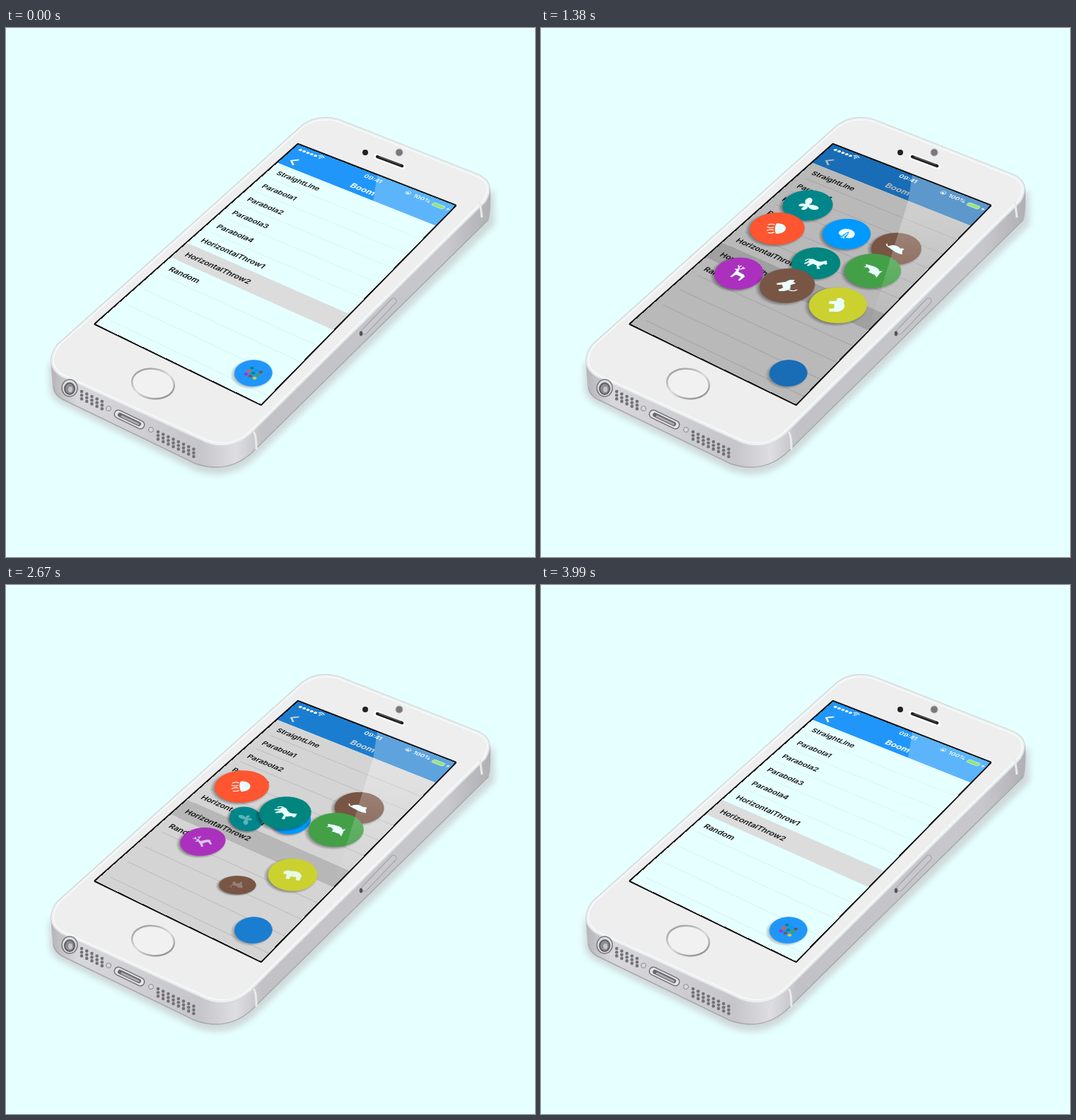
These frames come from a looping animation (748 px wide and 748 px high, 4.02 s). An HTML page:

```html
<!DOCTYPE html>
<html lang="en">
<head>
<meta charset="utf-8">
<title>Boom menu</title>
<style>
html, body { margin: 0; width: 100%; height: 100%; overflow: hidden; background: #e6ffff; }
svg { position: absolute; left: 0; top: 0; overflow: hidden; }
#screen { transform-origin: 0 0; font-family: Inter, Roboto, sans-serif; }
</style>
</head>
<body>
<svg width="748" height="748" id="phone">
  <defs>
    <linearGradient id="side" gradientUnits="userSpaceOnUse" x1="63" y1="0" x2="686" y2="0">
      <stop offset="0" stop-color="#b4b4b8"/><stop offset=".06" stop-color="#d8d8db"/>
      <stop offset=".34" stop-color="#c6c6ca"/><stop offset=".42" stop-color="#dedee2"/>
      <stop offset=".48" stop-color="#c2c2c6"/><stop offset=".9" stop-color="#c8c8cc"/>
      <stop offset="1" stop-color="#b0b0b4"/>
    </linearGradient>
    <linearGradient id="ring" x2="1" y2="1">
      <stop offset="0" stop-color="#8c8c8c"/><stop offset=".5" stop-color="#dcdcdc"/>
      <stop offset="1" stop-color="#777"/>
    </linearGradient>
    <filter id="soft"><feGaussianBlur stdDeviation="4"/></filter>
  </defs>
  <path d="M61 475L62 514Q66 527 80 533L268 626Q312 642 350 611L691 278L690 230Z" fill="#c6cccd" opacity=".75" filter="url(#soft)"/>
  <path d="M63 468L66 508Q68 520 80 526L268 617Q312 632 346 603L682 272Q686 264 685 226Z" fill="url(#side)"/>
  <path d="M67 508Q69 519 80 525L268 616Q312 631 346 602L682 271" fill="none" stroke="#a9a9ae" stroke-width="1.5"/>
  <path d="M72 448L418 138Q440 121 470 129L668 207Q694 219 678 246L346 574Q318 600 282 586L78 493Q52 476 72 448Z" fill="#eee" stroke="#d2d7d9" stroke-width="1.2"/>
  <path d="M75 449L420 140Q441 125 469 132L666 210Q689 220 675 244L344 571Q317 595 283 582L80 490Q57 475 75 449Z" fill="none" stroke="#f4fcfc" stroke-width="1.5"/>
  <path d="M350 571Q354 575 354 596M670 245L673 268" fill="none" stroke="#eaeaed" stroke-width="3"/>
  <path d="M507 429L548 386" stroke="#98989e" stroke-width="9" stroke-linecap="round"/>
  <path d="M507 429L548 386" stroke="#c8c8cd" stroke-width="7" stroke-linecap="round"/>
  <ellipse cx="502" cy="432" rx="2.3" ry="3.5" fill="#555"/>
  <g id="holes" fill="#717177"></g>
  <ellipse cx="90" cy="509" rx="11" ry="12" fill="#dcdce0" stroke="#77777c" stroke-width="1.5"/>
  <ellipse cx="90" cy="510" rx="7" ry="8" fill="#8d8d92" stroke="#5d5d62" stroke-width="2"/>
  <ellipse cx="91" cy="511" rx="3" ry="4" fill="#c5c5c9"/>
  <g stroke-linecap="round">
    <path d="M159 546L190 561" stroke="#707076" stroke-width="13"/>
    <path d="M159 546L190 561" stroke="#e4e4e8" stroke-width="10"/>
    <path d="M161 547L188 560" stroke="#68686d" stroke-width="6"/>
    <path d="M164 549L187 560" stroke="#adadb2" stroke-width="3"/>
    <path d="M524 182L561 196" stroke="#fff" stroke-width="8"/>
    <path d="M525 182L560 195" stroke="#222" stroke-width="4.5"/>
    <path d="M528 182L558 193" stroke="#777" stroke-width="1"/>
  </g>
  <g fill="#d8d8dc" stroke="#89898e"><circle cx="145" cy="538" r="3.5"/><circle cx="205" cy="568" r="3.5"/></g>
  <circle cx="508" cy="176" r="4" fill="#222"/>
  <circle cx="556" cy="176" r="5" fill="#77797d" stroke="#aaa"/>
  <ellipse cx="208" cy="503" rx="30" ry="21" transform="rotate(9 208 503)" fill="#f1f1f1" stroke="url(#ring)" stroke-width="2.5"/>
  <path d="M413 164.800L635 251L360.500 532L126.500 418.500Z" fill="#111" stroke="#111" stroke-width="4" stroke-linejoin="round"/>
</svg>

<svg width="320" height="568" id="screen">
  <defs>
    <radialGradient id="shade">
      <stop offset=".82" stop-opacity=".38"/><stop offset="1" stop-opacity="0"/>
    </radialGradient>
  </defs>
  <rect class="base" width="320" height="568"/>
  <rect y="328" width="320" height="44" fill="#dcdcdc"/>
  <g id="rows" font-size="15" font-weight="600" fill="#111"></g>
  <rect width="320" height="64" fill="#2196fa"/>
  <path d="M27 36.500L17 46L27 54.500" fill="none" stroke="#fff" stroke-width="3.5"/>
  <text x="166" y="53.500" font-size="17" font-weight="700" fill="#fff" text-anchor="middle">Boom</text>
  <circle cx="271" cy="524" r="32" fill="url(#shade)" opacity=".6"/>
  <circle cx="272" cy="520" r="29" fill="#2196fa"/>
  <rect id="dim" width="320" height="568"/>
  <g id="status" fill="#fff" font-size="12" font-weight="600">
    <path d="M49 8Q55 2 61 8M51.500 11Q55 7 58.500 11" fill="none" stroke="#fff" stroke-width="1.7"/>
    <circle cx="55" cy="13.500" r="1.600"/>
    <text x="165" y="17" font-size="13" text-anchor="middle">09:41</text>
    <circle cx="236" cy="13" r="4.500" fill="none" stroke="#fff" stroke-width="1.200"/>
    <path d="M234 12h4v4h-4z"/>
    <text x="264" y="18" text-anchor="middle">100%</text>
    <rect x="286" y="11.500" width="22" height="9" rx="2" fill="#6fd84a" stroke="#d9f7d0"/>
    <path d="M316 10L312 16H315L313 21L318 14H315Z"/>
  </g>
  <g id="items"></g>
</svg>

<svg width="748" height="748">
  <defs>
    <linearGradient id="fade" gradientUnits="userSpaceOnUse" x1="0" y1="270" x2="0" y2="430">
      <stop offset="0" stop-color="#fff" stop-opacity=".3"/><stop offset="1" stop-color="#fff" stop-opacity="0"/>
    </linearGradient>
    <mask id="fading"><rect width="748" height="748" fill="url(#fade)"/></mask>
  </defs>
  <path class="base" d="M525 208L635 251L463 427L519 245Z" mask="url(#fading)"/>
</svg>

<script>
const $ = id => document.getElementById(id);
const LOOP = 4020, OPEN = 270, CLOSE = 1950, FLIGHT = 1000, DELAY = 50;
const TOTAL = FLIGHT + 8 * DELAY;
const clamp = x => Math.min(1, Math.max(0, x));

// Maps the 320 x 568 screen onto a quadrilateral.
function perspective([x0, y0], [x1, y1], [x2, y2], [x3, y3]) {
  const sx = x0 - x1 + x2 - x3, sy = y0 - y1 + y2 - y3;
  const ax = x1 - x2, ay = y1 - y2, bx = x3 - x2, by = y3 - y2;
  const det = ax * by - bx * ay;
  const g = (sx * by - bx * sy) / det, h = (ax * sy - sx * ay) / det;
  const col = (x, y, w, size) => [x / size, y / size, 0, w / size];
  return `matrix3d(${[
    ...col(x1 - x0 + g * x1, y1 - y0 + g * y1, g, 320),
    ...col(x3 - x0 + h * x3, y3 - y0 + h * y3, h, 568),
    0, 0, 1, 0, x0, y0, 0, 1]})`;
}
$('screen').style.transform = perspective([413, 164.8], [635, 251], [360.5, 532], [126.5, 418.5]);

function grille(x, y, columns) {
  let dots = '';
  for (let c = 0; c < columns; c++)
    for (let r = 0; r < 3; r++)
      dots += `<circle cx="${x + c * 7.2}" cy="${y + c * 3.5 + r * 5.2}" r="2.3"/>`;
  return dots;
}
$('holes').innerHTML = grille(107, 514, 5) + grille(215, 571, 8);

const labels = ['StraightLine', 'Parabola1', 'Parabola2', 'Parabola3', 'Parabola4',
  'HorizontalThrow1', 'HorizontalThrow2', 'Random'];
let rows = '';
for (let i = 0; i < 11; i++) {
  rows += `<path d="M15 ${108 + 44 * i}H320" stroke="#c8c7cc" stroke-width=".8" class="line"/>`;
  if (labels[i]) rows += `<text x="16" y="${93 + 44 * i}">${labels[i]}</text>`;
}
$('rows').innerHTML = rows;
const lines = $('rows').querySelectorAll('.line');

let signal = '';
for (let i = 0; i < 5; i++) signal += `<circle cx="${12.5 + 8 * i}" cy="11" r="3"/>`;
$('status').insertAdjacentHTML('beforeend', signal);

// Colour, opening order, closing order, filled outline, stroked details
const items = [
  ['#00868a', 4, 1, 'M0-2C-4-14-18-16-17-8C-16-1-8 2-3 1C-10 4-10 13-5 13C-2 13 0 6 0 4C0 6 2 13 5 13C10 13 10 4 3 1C8 2 16-1 17-8C18-16 4-14 0-2Z', ''],
  ['#0099ff', 1, 2, 'M-4 9C-19 9-16-13 0-13C16-13 19 9 4 9L2-3L0-7L-2-3Z', 'M0-2V9M-3 13L0 9L3 13'],
  ['#795545', 3, 5, 'M-13 7C-13-3-4-7 4-5C6-10 12-8 10-4L17 3C13 6 8 6 4 7Z', 'M-12 6Q-17 7-19 2'],
  ['#ff5530', 7, 8, 'M-13 1C-13-17 13-17 13 1C8 4-8 4-13 1Z', 'M-9 4q-4 5 0 10M-3 5q3 5-1 10M4 5q-3 5 1 10M9 4q4 4 1 9'],
  ['#00857f', 2, 6, 'M-13 3C-15-4-12-7-6-6C0-5 5-6 8-11L11-15L17-8L15-5L12-6C11-1 10 2 8 3L14 8L10 11L4 4L-3 4L-6 13L-9 13L-9 4L-14 12L-16 10Z', 'M-12-3Q-18-3-18 5'],
  ['#43a047', 6, 7, 'M-16 9C-10-4-4-10 2-9L2-14L7-9C11-8 12-6 17-4L10-2C8 2 4 3 3 7L-1 4L-8 6L-9 13L-11 9Z', ''],
  ['#ab30be', 0, 3, 'M-13-5L-6-10L-3-3L8-2L13 1L12 14L9 14L8 5L-2 5L-4 14L-7 14L-7 2L-8-4Z', 'M-6-9L-13-16M-9-13L-8-18M-5-9L1-16M-2-13L-4-17'],
  ['#795545', 5, 0, 'M-12-6L-10-13L-6-10L-2-13L0-5L8-3C12 0 12 8 10 14L6 14L4 7L-4 7L-5 14L-9 14L-9 1Z', 'M9 0Q17-4 13-12'],
  ['#cbd12f', 8, 4, 'M-16-4L-10-9L-4-8C4-11 12-8 15 0L14 12L8 12L7 5L-2 5L-3 12L-9 12L-9 2L-15 1Z', '']
];
$('items').innerHTML = items.map(([color, , , shape, detail]) => `<g>
  <circle r="44" fill="url(#shade)"/>
  <g><circle r="40" fill="${color}"/><g fill="#e9ffff"><path d="${shape}"/>
  <path d="${detail}" fill="none" stroke="#e9ffff" stroke-width="2"/></g></g></g>`).join('');
const nodes = [...$('items').children];
const bases = document.querySelectorAll('.base');

// Ease out with a slight overshoot; closing plays it backwards.
function ease(x) {
  if (x <= 0) return 0;
  if (x >= 1) return 1;
  const d = x - 0.74;
  return clamp(1.079 - 1.377 * d * d * (1 - 0.58 * d) - 1) + clamp(1.079 - 1.377 * d * d * (1 - 0.58 * d));
}

function draw(now) {
  const t = now % LOOP;
  const since = (start, span) => clamp((t - start) / span);
  const dim = since(OPEN, TOTAL) - since(CLOSE, TOTAL);
  $('dim').setAttribute('opacity', 0.345 * dim);
  lines.forEach(l => l.setAttribute('opacity', dim > 0 ? 1 : 0.45));
  bases.forEach(b => b.setAttribute('fill', dim > 0 ? '#fff' : '#e6ffff'));

  items.forEach(([, first, last], i) => {
    const c = i % 3 - 1, r = Math.floor(i / 3) - 1;
    const phase = since(OPEN + first * DELAY, FLIGHT) - since(CLOSE + last * DELAY, FLIGHT);
    const p = ease(phase), size = k => 0.075 + 0.925 * k;
    const x0 = 272 + 8 * c, y0 = 520 + 8 * r;
    const x = x0 + (160 + 90 * c - x0) * p;
    const y = y0 + (285 + 90 * r - y0) * p * p;
    // The height grows later than the width, so a spinning button looks squashed.
    const spin = `rotate(${720 * p}) scale(${size(p)} ${size(p * p)})`;
    const [shadow, button] = nodes[i].children;
    nodes[i].setAttribute('transform', `translate(${x} ${y})`);
    shadow.setAttribute('transform', `translate(${-p} ${4 * p}) ${spin}`);
    shadow.setAttribute('opacity', clamp(phase * 5));
    button.setAttribute('transform', spin);
    button.lastElementChild.setAttribute('opacity', clamp(p ** 4));
  });
}

function tick() {
  draw(performance.now());
  requestAnimationFrame(tick);
}
tick();
</script>
</body>
</html>
```
